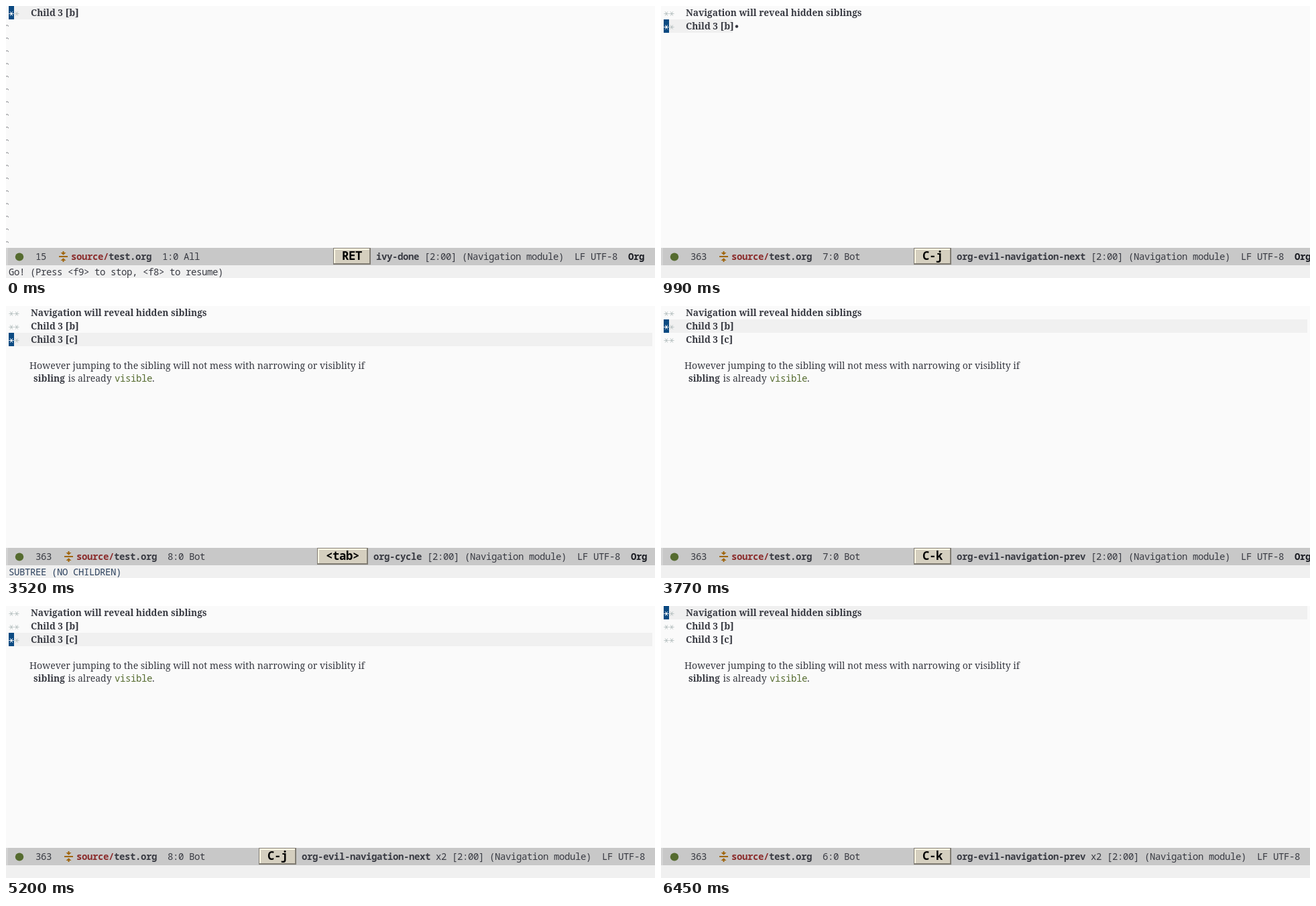
Write an HTML page with a canvas that moves like this. It is 968x406 px and loops after 8000 ms.

```html
<!DOCTYPE html>
<html lang="en">
<head>
<meta charset="utf-8">
<title>Outline navigation</title>
<style>
html, body { margin: 0; width: 100%; height: 100%; overflow: hidden; background: #fafafa; }
canvas { display: block; }
</style>
</head>
<body>
<canvas id="stage" width="968" height="406"></canvas>
<script>
const ctx = document.getElementById('stage').getContext('2d');
const LOOP = 8000;
const MONO = '"Noto Sans Mono", "Liberation Mono", monospace';
const SERIF = '"Noto Serif", "Liberation Serif", serif';
const F = {
  mono: `14px ${MONO}`,
  monoBold: `bold 14px ${MONO}`,
  key: `bold 17.333px ${MONO}`,
  body: `14px ${SERIF}`,
  head: `bold 13.7px ${SERIF}`
};
const C = {
  bg: '#fafafa', line: '#f0f0f0', bar: '#c8c8c8', ink: '#383a42', dark: '#1b1d24',
  cursor: '#0b4a82', star: '#bcc5c5', green: '#556b2f', red: '#8b2c2c', gold: '#a0660f'
};
const CELL = 8, ROW = 20;
const NAV = 'Navigation will reveal hidden siblings', B = 'Child 3 [b]', CH = 'Child 3 [c]';

// Mode line states
const next = { key: 'C-j', cmd: 'org-evil-navigation-next', x: 441 };
const prev = { key: 'C-k', cmd: 'org-evil-navigation-prev', x: 441 };
const next2 = { ...next, twice: true };
const prev2 = { ...prev, twice: true };
const done = { key: 'RET', cmd: 'ivy-done', x: 552 };
const cycle = { key: '<tab>', cmd: 'org-cycle', x: 548 };

const full = (at, row, mode, echo) =>
  ({ at, rows: [NAV, B, CH], row, mode, echo, body: true, wide: true, pos: `${row + 6}:0 Bot` });

const scenes = [
  { at: 0, rows: [B], row: 0, mode: done, pos: '1:0 All', narrow: true,
    echo: 'Go! (Press <f9> to stop, <f8> to resume)' },
  { at: 500, rows: [NAV, B], row: 0, mode: prev, pos: '6:0 Bot', wide: true, fold: 1 },
  { at: 990, rows: [NAV, B], row: 1, mode: next, pos: '7:0 Bot', fold: 1 },
  { at: 2160, rows: [NAV, B, CH], row: 2, mode: next2, pos: '8:0 Bot', fold: 2 },
  full(3520, 2, cycle, 'SUBTREE (NO CHILDREN)'),
  full(3770, 1, prev),
  full(4410, 0, prev2),
  full(4690, 1, next),
  full(5200, 2, next2),
  full(5440, 1, prev),
  full(6450, 0, prev2)
];

function rect(x, y, w, h, color) {
  ctx.fillStyle = color;
  ctx.fillRect(x, y, w, h);
}

function text(str, x, y, font, color = C.ink) {
  ctx.font = font;
  // Terminal fonts sit on whole-pixel cells
  ctx.letterSpacing = font.includes('Mono') ? '-0.4px' : '0px';
  ctx.fillStyle = color;
  ctx.fillText(str, x, y);
}

function dot(x, y, rx, ry, color) {
  ctx.fillStyle = color;
  ctx.beginPath();
  ctx.ellipse(x, y, rx, ry, 0, 0, Math.PI * 2);
  ctx.fill();
}

function star(x, y, color) {
  ctx.strokeStyle = color;
  ctx.lineWidth = 1;
  ctx.beginPath();
  for (let i = 0; i < 3; i++) {
    const a = i * Math.PI / 3, dx = Math.cos(a) * 3.6, dy = Math.sin(a) * 3.6;
    ctx.moveTo(x - dx, y - dy);
    ctx.lineTo(x + dx, y + dy);
  }
  ctx.stroke();
}

function tildes() {
  ctx.strokeStyle = '#74777c';
  ctx.lineWidth = 1;
  for (let i = 0; i < 18; i++) {
    const y = 29.5 + i * 19;
    ctx.beginPath();
    ctx.moveTo(0, y);
    ctx.quadraticCurveTo(1.8, y - 2, 3, y);
    ctx.lineTo(4, y + 0.8);
    ctx.stroke();
  }
}

function buffer(s) {
  const top = s.row * ROW;
  const end = s.wide ? 964 : s.rows[s.row] === CH ? 105 : 107;
  rect(4, top, end - 4, ROW, C.line);
  rect(4, top, CELL, ROW, C.cursor);
  s.rows.forEach((title, i) => {
    const y = i * ROW;
    star(8, y + 11.5, i === s.row ? '#ffffff' : C.star);
    star(16, y + 11.5, C.star);
    text(title, 37, y + 15, F.head);
    if (s.fold === i) dot(title === CH ? 111 : 113, y + 10.5, 2.2, 2.2, C.ink);
  });
  if (s.narrow) tildes();
  if (s.body) {
    text('However jumping to the sibling will not mess with narrowing or visiblity if', 35, 94, F.body);
    text('sibling', 41, 113, F.head);
    text('is already', 92.5, 113, F.body);
    text('visible', 162, 113, F.mono, C.green);
    text('.', 218, 113, F.body);
  }
}

// Two arrows squeezing a bar
function narrowIcon(x, y) {
  rect(x, y - 1, 13, 2, C.gold);
  for (const d of [-1, 1]) {
    rect(x + 5.5, d < 0 ? y - 8 : y + 5, 2, 3, C.gold);
    ctx.beginPath();
    ctx.moveTo(x + 2.5, y + d * 6);
    ctx.lineTo(x + 10.5, y + d * 6);
    ctx.lineTo(x + 6.5, y + d * 2.2);
    ctx.fill();
  }
}

function keycap(label, right) {
  const w = label.length * 10 + 26, x = right - w, y = 361, h = 25;
  rect(x, y, w, h, '#807c73');
  rect(x + 1, y + 1, w - 3, h - 3, '#fff8e5');
  rect(x + 3, y + 3, w - 5, h - 5, '#d5cfbf');
  text(label, x + 13, 379, F.key, '#000');
}

function modeLine(s) {
  const y = 379, m = s.mode;
  rect(0, 361, 968, 26, C.bar);
  rect(0, 361, 3, 26, '#d3d3d3');
  dot(20, 374.5, 6.2, 6, C.green);
  const size = s.narrow ? '15' : '363';
  text(size, 44, y, F.mono);
  const x = 44 + size.length * CELL;
  narrowIcon(x + 19, 374);
  text('source/', x + 37, y, F.monoBold, C.red);
  text('test.org', x + 93, y, F.monoBold);
  text(s.pos, x + 173, y, F.mono);

  keycap(m.key, m.x - 8);
  text(m.cmd, m.x, y, F.monoBold);
  let at = m.x + (m.cmd.length + 1) * CELL;
  if (m.twice) {
    text('x2', at, y, F.mono);
    at += 3 * CELL;
  }
  text('[2:00] (Navigation module)', at, y, F.mono);
  text('LF UTF-8', at + 28 * CELL, y, F.mono);
  if (!m.twice) text('Org', at + 38 * CELL, y, F.monoBold, C.dark);
}

function draw(t) {
  const s = scenes.findLast(scene => scene.at <= t);
  rect(0, 0, 968, 406, C.bg);
  buffer(s);
  modeLine(s);
  rect(0, 387, 968, 19, C.line);
  if (s.echo) text(s.echo, 4, 402, F.mono, s.body ? '#2f4460' : C.ink);
}

const start = performance.now();
function tick() {
  draw((performance.now() - start) % LOOP);
  requestAnimationFrame(tick);
}
tick();
</script>
</body>
</html>
```
